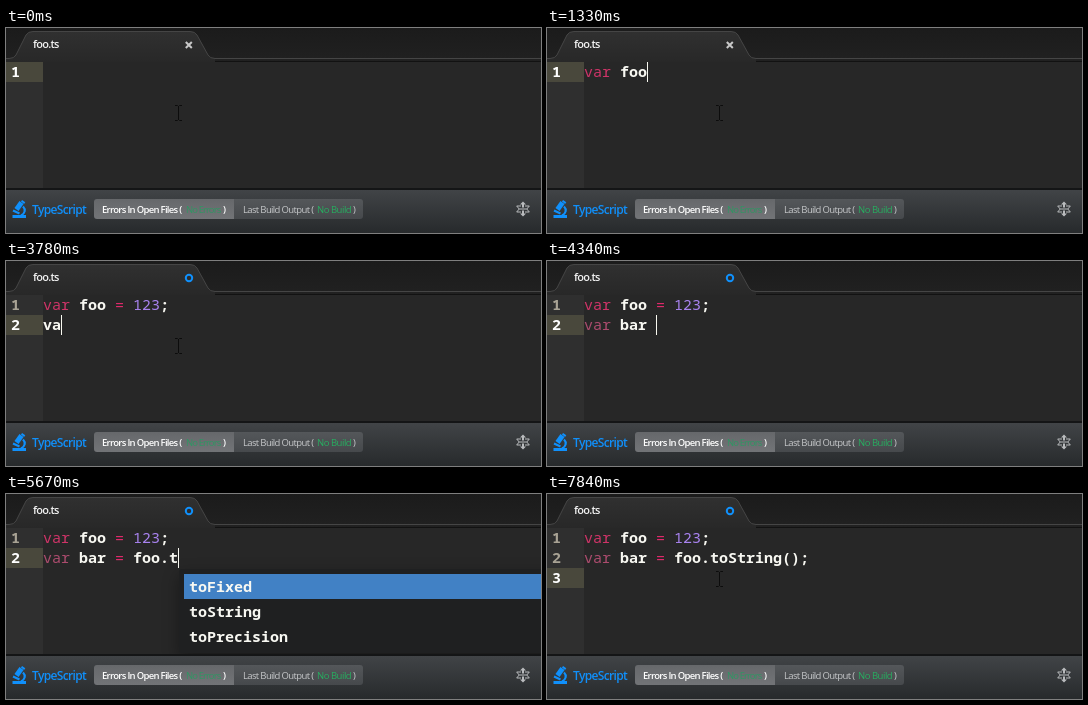
An HTML page that plays this animation: 535 px wide and 205 px high, repeating every 8000 ms.

```html
<!DOCTYPE html>
<html lang="en">
<head>
<meta charset="utf-8">
<title>Typing in foo.ts</title>
<style>
html, body { margin: 0; width: 100%; height: 100%; overflow: hidden; background: #272727; }
svg { display: block; }
text { white-space: pre; }
.code { font: 600 15px "Noto Sans Mono", "DejaVu Sans Mono", monospace; fill: #f8f8f2; }
.ui { font-family: "Open Sans", "Noto Sans", sans-serif; }
.label { font-size: 9.5px; }
.strong { font-weight: 600; }
.key { fill: #cf3468; font-weight: 400; }
.soft { fill: #ac4c6e; font-weight: 400; }
.op { fill: #e02a6c; font-weight: 500; }
.num { fill: #a983f0; font-weight: 500; }
.bold { font-weight: 800; }
</style>
</head>
<body>
<svg width="535" height="205" viewBox="0 0 535 205">
  <defs>
    <linearGradient id="bar" x2="0" y2="1">
      <stop stop-color="#1b1b1b"/><stop offset="1" stop-color="#212121"/>
    </linearGradient>
    <linearGradient id="tab" x2="0" y2="1">
      <stop stop-color="#303030"/><stop offset="1" stop-color="#282828"/>
    </linearGradient>
    <linearGradient id="panel" x2="0" y2="1">
      <stop stop-color="#424548"/><stop offset="1" stop-color="#272a2c"/>
    </linearGradient>
    <linearGradient id="on" x2="0" y2="1">
      <stop stop-color="#66686b"/><stop offset="1" stop-color="#727477"/>
    </linearGradient>
    <linearGradient id="off" x2="0" y2="1">
      <stop stop-color="#54575a"/><stop offset="1" stop-color="#46494c"/>
    </linearGradient>
    <filter id="shadow" x="-20%" y="-60%" width="140%" height="240%" color-interpolation-filters="sRGB">
      <feDropShadow dx="0" dy="6" stdDeviation="8" flood-opacity=".35"/>
    </filter>
  </defs>

  <rect width="535" height="205" fill="#272727"/>
  <rect width="535" height="33" fill="url(#bar)"/>
  <path d="M209 33.5H535" stroke="#121212"/>
  <path d="M0 34V30.5H3Q8 30.5 10 27L20 7Q22 3.5 27 3.5H184Q189 3.5 191 7L202 27Q204 30.5 209 30.5V34Z" fill="url(#tab)"/>
  <path d="M0 30.5H3Q8 30.5 10 27L20 7Q22 3.5 27 3.5H184Q189 3.5 191 7L202 27Q204 30.5 209 30.5H535" fill="none" stroke="#454545"/>
  <text class="ui strong" x="27" y="20" font-size="11" letter-spacing="-.75" fill="#f4f4f4">foo.ts</text>
  <path id="close" d="M179.8 14l6 6m0-6l-6 6" stroke="#c8c8c8" stroke-width="2"/>
  <circle id="dirty" cx="183" cy="17" r="3.2" fill="none" stroke="#1090fb" stroke-width="2"/>

  <rect y="34" width="37" height="126" fill="#2f2f2f"/>
  <rect id="active" width="37" height="20" fill="#49483c"/>
  <g id="code"></g>
  <path id="pointer" d="M169 77.5h2.5l1 1 1-1h2.5M172.5 78v14M169 92.5h2.5l1-1 1 1h2.5" fill="none" stroke="#0c0c0c"/>
  <rect id="caret" width="1" height="20" fill="#f8f8f0"/>
  <g id="popup"></g>

  <rect y="160" width="535" height="45" fill="url(#panel)"/>
  <path d="M0 161H535" stroke="#141516" stroke-width="2"/>
  <g fill="none" stroke="#1090fb">
    <path d="M10.5 181.5l5-7" stroke-width="5"/>
    <path d="M15.5 172.8l3.2 2.3" stroke-width="2"/>
    <path d="M17 178.5c3 3 2 7-2 9M7 182.5l6.5 3" stroke-width="2.2"/>
    <path d="M6.5 188.5h13.5" stroke-width="3"/>
  </g>
  <text class="ui strong" x="26" y="186" font-size="12" letter-spacing="-.66" fill="#1090fb">TypeScript</text>
  <path d="M228 171H91a3 3 0 0 0-3 3v14a3 3 0 0 0 3 3H228Z" fill="url(#on)"/>
  <path d="M228 171H354a3 3 0 0 1 3 3v14a3 3 0 0 1-3 3H228Z" fill="url(#off)"/>
  <g class="ui label">
    <g fill="#fff">
      <text class="strong" x="96" y="185" letter-spacing="-.7">Errors In Open Files (</text>
      <text x="180" y="185" letter-spacing="-.9" fill="#2f9663">No Errors</text>
      <text class="strong" x="217" y="185">)</text>
    </g>
    <g fill="#c6c8ca">
      <text x="237" y="185" letter-spacing="-.64">Last Build Output (</text>
      <text x="311" y="185" letter-spacing="-.48" fill="#27ae60">No Build</text>
      <text x="347" y="185">)</text>
    </g>
  </g>
  <g transform="translate(510 173.5)">
    <path d="M5 4.5H.7L3.2 7.5H10.8L13.3 4.5H9M3.2 7.5L.7 10.5H5M10.8 7.5l2.5 3H9" fill="none" stroke="#b9bbbd"/>
    <path d="M6 6h2V3h2L7 0 4 3h2zM6 9h2v3h2l-3 3-3-3h2z" fill="#b9bbbd"/>
  </g>
</svg>
<script>
const LOOP = 8000, LEFT = 37, TOP = 34, ADV = 9, ROW = 20, DIRTY_AT = 1680;
const POINTER_OFF = 3850, POINTER_ON = 5740;
const one = "var foo = 123;\n", two = one + "var bar = foo.";
const numeric = ["toFixed", "toString", "toPrecision"];

// [time, text, popup items, caret shift]; a shift of null hides the caret
const steps = [
  [0, "", [], null], [280, ""],
  [630, "v"], [700, "va"], [770, "va", ["var", "var"]], [840, "var"], [910, "var "],
  [1050, "var f"], [1190, "var fo"], [1330, "var foo"], [1400, "var foo "],
  [1680, "var foo ="], [1820, "var foo = "], [1960, "var foo = 1"],
  [2100, "var foo = 12"], [2240, "var foo = 123"], [2380, "var foo = 123;"],
  [2520, one], [2940, one, [], null], [3290, one],
  [3640, one + "v"], [3780, one + "va"], [3850, one + "var", ["var"]], [3920, one + "var "],
  [4060, one + "var b"], [4130, one + "var ba"], [4200, one + "var bar"], [4340, one + "var bar "],
  [4760, one + "var bar ="], [4830, one + "var bar = "], [4970, one + "var bar = f"],
  [5040, one + "var bar = fo"], [5180, one + "var bar = foo"], [5250, two],
  [5390, two, ["toExponential", "toFixed", "toLocaleString"]],
  [5530, two + "t"], [5600, two + "t", numeric], [5740, two + "to"],
  [5810, two + "toS"], [5880, two + "toS", ["toString"]], [5950, two + "toSt"],
  [6090, two + "toStr"], [6230, two + "toStri"], [6370, two + "toStrin"], [6510, two + "toString"],
  [6860, two + "toString()", [], -1], [7070, two + "toString();"],
  [7420, two + "toString();", [], null], [7490, two + "toString();\n"],
  [7840, two + "toString();\n", [], null]
];

const $ = id => document.getElementById(id);
const set = (id, attrs) => Object.entries(attrs).forEach(([k, v]) => $(id).setAttribute(k, v));
const show = (id, on) => set(id, { visibility: on ? "visible" : "hidden" });
const span = (cls, s) => `<tspan class="${cls}">${s}</tspan>`;
const codeText = (x, y, body, attrs = "") => `<text class="code" x="${x}" y="${y}" ${attrs}>${body}</text>`;

function paint(line, row) {
  return line.replace(/\bvar\b|=|\d+/g, s =>
    span(s === "var" ? (row ? "soft" : "key") : s === "=" ? "op" : "num", s));
}

function popup(items, x, y, prefix) {
  if (!items.length) return "";
  const rows = items.map((s, i) =>
    codeText(x + 11, y + 23 + 25 * i, span("bold", s.slice(0, prefix)) + s.slice(prefix)));
  return `<rect x="${x + 1}" y="${y}" width="560" height="${9 + 25 * items.length}" rx="3" fill="#1f2021" filter="url(#shadow)"/>
    <rect x="${x + 6}" y="${y + 5}" width="550" height="25" fill="#4181c5"/>` + rows.join("");
}

function draw([, text, items = [], shift = 0]) {
  const lines = text.split("\n"), last = lines.length - 1;
  const y = TOP + ROW * last;
  const x = LEFT + ADV * (lines[last].length + (shift || 0));
  const prefix = lines[last].match(/\w*$/)[0].length;
  $("code").innerHTML = lines.map((line, i) => {
    const base = TOP + ROW * i + 15;
    return codeText(5, base, i + 1, `style="fill:${i === last ? "#fff" : "#a8a294"}"`)
      + codeText(LEFT, base, paint(line, i));
  }).join("");
  set("active", { y });
  set("caret", { x, y });
  show("caret", shift !== null);
  $("popup").innerHTML = popup(items, x, y + 21, prefix);
}

let current;
function frame(now) {
  const t = now % LOOP;
  const step = steps.findLast(s => s[0] <= t);
  if (step !== current) {
    current = step;
    draw(step);
    show("close", t < DIRTY_AT);
    show("dirty", t >= DIRTY_AT);
    show("pointer", t < POINTER_OFF || t >= POINTER_ON);
  }
}

const start = performance.now();
function tick() {
  frame(performance.now() - start);
  requestAnimationFrame(tick);
}
tick();
</script>
</body>
</html>
```
